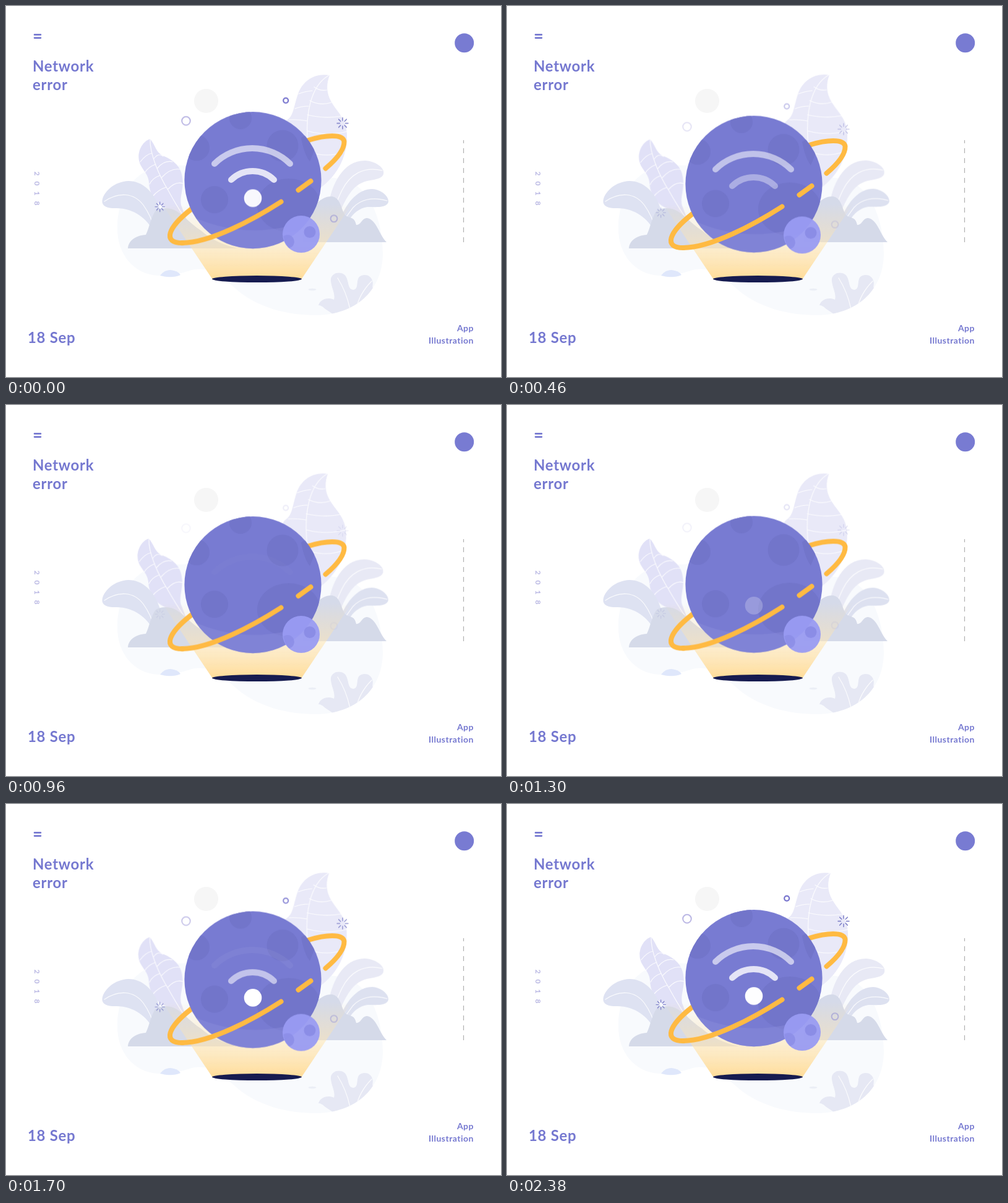
Write an HTML page that moves like this. It is 800x600 px and loops after 2.4 s.

```html
<!DOCTYPE html>
<html lang="en">
<head>
<meta charset="utf-8">
<title>Network error</title>
<style>
  html, body { margin: 0; width: 100%; height: 100%; overflow: hidden; background: #fff; }
  svg { display: block; width: 100vw; height: 100vh; }
  text { font-family: Lato, "Open Sans", sans-serif; font-weight: 700; fill: #7578d0; }
  .big { font-size: 24px; letter-spacing: .7px; }
  .small { font-size: 14px; letter-spacing: .5px; text-anchor: end; }
  .year { font-size: 12px; letter-spacing: 9px; fill: #b9b7e3; }
  .vein { fill: none; stroke: #fff; stroke-width: 1.2; stroke-linecap: round; opacity: .85; }
  .ring { fill: none; stroke: #ffba42; stroke-width: 8; stroke-linecap: round; }
  .wave { fill: none; stroke: #fff; stroke-width: 10; stroke-linecap: round; }

  .float { animation: float 2400ms ease -30ms infinite; }
  .ghost { animation: float 2400ms ease -30ms infinite, ghost 2400ms ease -30ms infinite; }
  .sway { animation: sway 2400ms ease -30ms infinite; }
  .dot { animation: drop 2400ms ease -40ms infinite, dot 2400ms linear infinite; }
  .inner { animation: float 2400ms ease -2380ms infinite, inner 2400ms linear infinite; }
  .outer { animation: float 2400ms ease -2340ms infinite, outer 2400ms linear infinite; }

  @keyframes float {
    0%, 100% { transform: translateY(0); }
    50.4% { transform: translateY(var(--d)); }
  }
  @keyframes drop {
    0%, 92.7%, 100% { transform: translateY(0); }
    41.7%, 51% { transform: translateY(var(--d)); }
  }
  @keyframes sway {
    0%, 100% { transform: rotate(0deg); }
    50.4% { transform: rotate(var(--a)); }
  }
  @keyframes ghost { 0%, 100% { opacity: 1; } 50.4% { opacity: .1; } }
  @keyframes dot {
    0%, 100% { opacity: .95; }
    15.8%, 50% { opacity: 0; }
    67.5%, 99% { opacity: 1; }
  }
  @keyframes inner {
    0%, 8.3%, 76.5%, 100% { opacity: .8; }
    29.2%, 58.5% { opacity: 0; }
  }
  @keyframes outer {
    0%, 16.7%, 87%, 100% { opacity: .6; }
    40.7%, 69.3% { opacity: 0; }
  }
</style>
</head>
<body>
<svg viewBox="0 0 800 600">
  <defs>
    <linearGradient id="beam" x1="0" y1="320" x2="0" y2="441" gradientUnits="userSpaceOnUse">
      <stop offset="0" stop-color="#ffe2a6" stop-opacity="0"/>
      <stop offset=".5" stop-color="#ffe5b0" stop-opacity=".5"/>
      <stop offset="1" stop-color="#ffdc9a"/>
    </linearGradient>
    <clipPath id="globe"><circle cx="399" cy="281.6" r="110.6"/></clipPath>
    <clipPath id="ground"><use href="#blob"/></clipPath>
    <path id="blob" d="M180 360C180 310 205 264 252 260C340 250 470 270 545 280C590 292 609 350 609 400C609 460 565 500 500 500C450 500 408 486 378 463C350 440 334 420 300 427C280 434 264 436 246 436C205 434 180 400 180 360Z"/>
    <path id="spark" d="M0-4.5V-9M3.2-3.2L6.4-6.4M4.5 0H9M3.2 3.2L6.4 6.4M0 4.5V9M-3.2 3.2L-6.4 6.4M-4.5 0H-9M-3.2-3.2L-6.4-6.4" fill="none" stroke="#7476c4" stroke-width="1.4" stroke-linecap="round"/>
  </defs>

  <!-- ground -->
  <use href="#blob" fill="#f8fafd"/>
  <circle cx="323.5" cy="153.5" r="19.5" fill="#f6f6f6"/>
  <path d="M249 436Q255 427 266 427Q278 428 282 435Q268 441 249 436Z" fill="#dfe7fb"/>
  <ellipse cx="495" cy="458.5" rx="6.5" ry="1.7" fill="#eceff6"/>
  <g clip-path="url(#ground)">
    <path d="M505 484C508 473 522 471 530 475C533 464 524 453 525 441C528 429 547 428 551 441C554 449 553 458 561 459C571 458 565 445 571 438C578 432 590 435 592 444C595 451 588 456 598 461L590 490L540 506L516 490Q510 484 505 484Z" fill="#e6e8f4"/>
    <path class="vein" d="M536 440Q550 462 556 490M591 445Q571 465 566 490"/>
  </g>

  <!-- plants -->
  <g class="sway" style="--a:-.9deg;transform-origin:480px 300px">
    <path d="M523 112C500 108 480 120 472 142C464 166 465 176 455 184C440 194 430 240 450 300H500C535 277 552 245 551 207C550 183 536 172 527 157C518 142 517 128 523 112Z" fill="#e9e9f8"/>
    <path class="vein" d="M522 112C490 130 485 180 487 215Q489 250 496 292M498 131Q508 138 518 136M491 153Q508 162 526 156M487 176Q515 183 543 178M487 202Q518 211 551 203M489 236Q520 246 546 236M495 137Q483 138 473 142M489 162Q477 162 467 166M487 186Q470 183 458 184"/>
  </g>
  <g class="sway" style="--a:-1deg;transform-origin:290px 345px">
    <path d="M233 215C220 219 212 236 215 250C218 264 230 270 231 285C232 304 240 320 262 328L292 346L283 322C280 308 288 297 285 277C283 257 266 247 253 242C242 236 242 226 233 215Z" fill="#e1e1f7"/>
    <path class="vein" d="M233 215C232 240 248 275 262 298Q274 320 290 345M236 238Q226 240 217 252M242 256Q230 260 224 270M249 274Q237 278 232 288M259 293Q246 297 237 308M239 247Q246 237 254 243M245 262Q256 249 269 252M252 277Q266 262 281 264M262 296Q274 283 286 287"/>
  </g>
  <path d="M238 364C228 344 206 326 176 327C162 327 153 323 156 312C160 299 175 284 198 283C220 283 240 300 249 330L258 364Z" fill="#dee2f2"/>
  <path class="vein" d="M159 316C182 300 207 302 222 322Q235 340 240 362"/>
  <g class="sway" style="--a:-.6deg;transform-origin:535px 340px">
    <path d="M520 330C525 288 545 250 580 250C598 251 613 262 610 272C606 283 588 279 573 287C556 296 546 318 537 340Z" fill="#e8e9f5"/>
    <path class="vein" d="M608 266C578 259 556 272 543 298Q534 316 529 335"/>
    <path d="M540 345C552 314 571 296 592 296C607 297 619 308 618 317C615 327 598 325 584 325C571 327 561 335 554 347Z" fill="#dde1f0"/>
    <path class="vein" d="M616 315C592 308 573 313 561 326L547 345"/>
  </g>

  <!-- hills and light beam -->
  <path d="M197 392C198 379 210 371 226 370C232 358 234 341 242 331C252 325 266 326 276 332C290 341 298 352 315 363Q338 384 375 392Z" fill="#d5dae9"/>
  <path d="M480 382V340C497 326 508 307 527 308C542 311 541 330 549 339C556 344 563 340 566 354C575 354 574 343 584 343C599 346 603 370 615 382Z" fill="#d5dae9"/>
  <path d="M333 441L252 320H559L478 441Z" fill="url(#beam)"/>
  <ellipse cx="405.5" cy="441.6" rx="72.5" ry="5.5" fill="#161b50"/>

  <!-- orbit behind the planet -->
  <g class="float" style="--d:11.5px">
    <path class="ring" d="M478 220L490 216.5C515 208.5 545 206 546.5 219C547 231 536 246 516.5 262.5M285 383C252 383 262 358 298 329.5L310 320"/>
  </g>

  <!-- planet -->
  <g class="float" style="--d:9.4px">
    <circle cx="399" cy="281.6" r="110.6" fill="#787bd2"/>
    <g clip-path="url(#globe)" fill="#7275ca">
      <circle cx="379" cy="181" r="18"/>
      <circle cx="308" cy="229" r="21"/>
      <circle cx="447" cy="226" r="25.5"/>
      <circle cx="337" cy="313" r="22"/>
      <ellipse cx="457" cy="322" rx="51" ry="43"/>
      <path d="M477 213Q482 240 491 251L503 222L490 205Z"/>
      <path d="M300 340Q400 385 505 340V400H300Z" fill="#8d90dc" opacity=".4"/>
    </g>
  </g>

  <!-- signal -->
  <path class="wave outer" style="--d:16px" d="M337 255A87 87 0 0 1 459 255"/>
  <path class="wave inner" style="--d:16px" d="M364 281A49.5 49.5 0 0 1 433 281"/>
  <circle class="dot" style="--d:16px" cx="399" cy="310.4" r="14.3" fill="#fff"/>

  <!-- orbit in front -->
  <g class="float" style="--d:11.5px">
    <path class="ring" d="M472.5 297.5L492.5 283M444.5 316.5C400 345 330 383 285 383"/>
  </g>

  <!-- moon -->
  <g class="float" style="--d:2px">
    <circle cx="477" cy="369" r="30" fill="#999bf3" opacity=".95"/>
    <circle cx="491" cy="365.5" r="9.5" fill="#8b8de6"/>
    <path d="M448.5 372A11 11 0 1 1 458 391.5A30 30 0 0 1 448.5 372Z" fill="#8b8de6" opacity=".8"/>
  </g>

  <!-- drifting bits -->
  <g class="ghost" style="--d:14px" fill="none" stroke-width="2">
    <circle cx="291" cy="185.6" r="6.8" stroke="#bab6e4"/>
    <circle cx="452.2" cy="152.6" r="4" stroke="#7673cd" stroke-width="2.2"/>
    <circle cx="530" cy="343.6" r="5.4" stroke="#b2b0d8"/>
    <use href="#spark" x="544" y="189.5"/>
    <use href="#spark" transform="translate(248.7 324.5) scale(.85)"/>
  </g>

  <!-- page furniture -->
  <path d="M46 46.4H56M46 51.6H56" stroke="#7578d0" stroke-width="2.6" stroke-linecap="round"/>
  <circle cx="740.7" cy="59.7" r="15.5" fill="#787bd2"/>
  <path d="M739.5 217V382.5" stroke="#b0b0b0" stroke-width="1.2" stroke-dasharray="8 8" stroke-dashoffset="3"/>
  <text class="big" x="43" y="106">Network</text>
  <text class="big" x="43" y="136.3">error</text>
  <text class="big" x="35" y="545.3">18 Sep</text>
  <text class="small" x="756" y="526">App</text>
  <text class="small" x="756" y="546">Illustration</text>
  <text class="year" transform="translate(46 267.5) rotate(90)">2018</text>
</svg>
</body>
</html>
```
